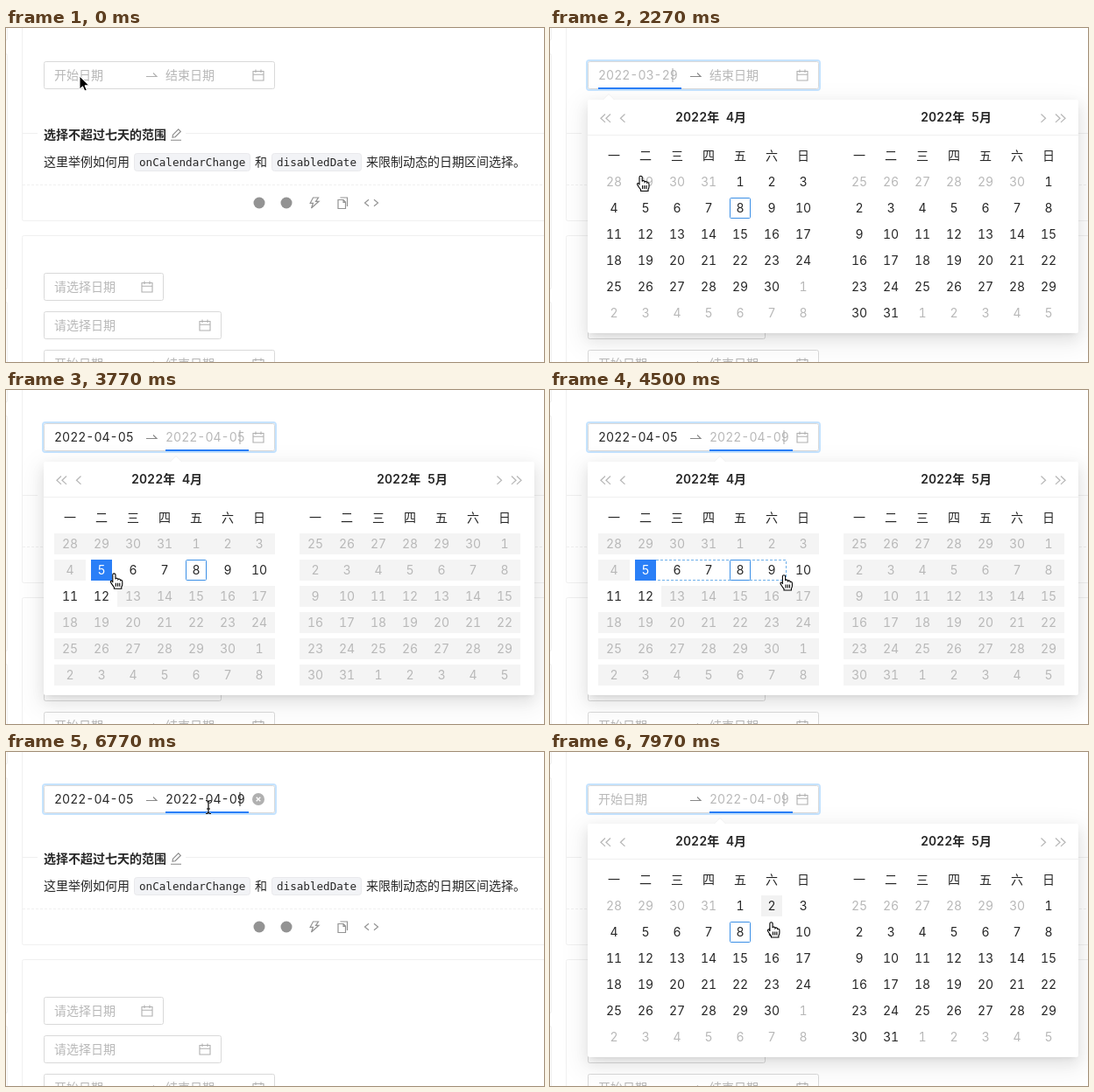
Recreate the animation shown at these times as an HTML page. Size 614x382 px, loop 8000 ms.

```html
<!DOCTYPE html>
<html lang="zh-CN">
<head>
<meta charset="utf-8">
<style>
  html, body { margin: 0; width: 100%; height: 100%; overflow: hidden; background: #fff; }
  svg { display: block; width: 614px; height: 382px; }
  text {
    font: 14px Inter, "Noto Sans CJK SC", "Noto Sans CJK", sans-serif;
    font-variant-numeric: tabular-nums; fill: #262626; white-space: pre;
  }
  .bold { font-weight: 600; }
  .mid { text-anchor: middle; }
  .off { fill: #b8b8b8; }
  .picked { fill: #fff; }
  .code { font: 12.6px "DejaVu Sans Mono", monospace; }
  .line { fill: none; stroke: #f0f0f0; }
  .box { fill: #fff; stroke: #d9d9d9; }
  .icon { fill: none; stroke: #b0b0b0; stroke-width: 1.1; }
  .nav { fill: none; stroke: #b8b8b8; stroke-width: 1.3; }
  .tool { fill: none; stroke: #666; stroke-width: 1.2; }
</style>
</head>
<body>
<svg id="stage" viewBox="0 0 614 382"></svg>
<script>
const BLUE = '#2a7ff7';
const START = 8, TODAY = 11, END = 12, LAST = 15;   // cell indices in the left month
const FOCUS = 1730, OPEN = 1780, PICK_START = 3300, PICK_END = 4970, CLOSE = 5280, REOPEN = 6820;

// ---------- markup helpers ----------
const text = (x, y, s, cls = '', id = '') => `<text id="${id}" x="${x}" y="${y + 5}" class="${cls}">${s}</text>`;
const rect = (x, y, w, h, attrs = '') => `<rect x="${x}" y="${y}" width="${w}" height="${h}" ${attrs}/>`;
const path = (d, attrs) => `<path d="${d}" ${attrs}/>`;
const input = (y, w, attrs = '') => rect(43.5, y + .5, w - 1, 31, `rx="2" class="box" ${attrs}`);
const calendarIcon = (x, y, id = '') =>
  path(`M${x - 6} ${y - 4.5}h12v10.5h-12zM${x - 6} ${y - .8}h12M${x - 3} ${y - 6.5}v3.5M${x + 3} ${y - 6.5}v3.5`, `class="icon" id="${id}"`);
const swapIcon = (y, id = '') => path(`M160 ${y + 1.5}h12l-4 -4`, `class="icon" id="${id}"`);
const chip = (x, w, s) => rect(x + .5, 143.5, w - 1, 20, 'rx="3" fill="#f2f3f6" stroke="#e9e9ec"') + text(x + 6, 152.7, s, 'code');
const chevron = (x, dir) => `M${x + dir * 2.5} 98.5l${-dir * 5} 4.7l${dir * 5} 4.7`;

const cellX = i => 73 + 36 * (i % 7);
const cellY = i => 176 + 30 * Math.floor(i / 7);
const cellDate = (month, i) => month ? new Date(2022, 3, 25 + i) : new Date(2022, 2, 28 + i);
const cellBox = (i, attrs) => rect(cellX(i) - 12, cellY(i) - 12, 24, 24, attrs);
const cells = Array.from({ length: 84 }, (_, n) => {
  const month = n < 42 ? 0 : 1, i = n % 42, date = cellDate(month, i);
  return { month, i, day: date.getDate(), inside: date.getMonth() === 3 + month };
});

const page = () =>
  rect(-20, -20, 21.5, 34, 'rx="2" class="line"') +
  rect(-20, 29.5, 21.5, 269, 'rx="2" class="line"') +
  rect(-20, 313.5, 21.5, 100, 'rx="2" class="line"') +
  rect(18.5, -20, 640, 240.5, 'rx="2" class="line"') +
  rect(18.5, 237.5, 640, 200, 'rx="2" class="line"') +
  path('M19 120.5H36M205 120.5H614', 'class="line"') +
  path('M19 179.5H614', 'class="line" stroke-dasharray="3 2"') +
  text(43, 122, '选择不超过七天的范围', 'bold') +
  path('M188 128.3h12M190 125.2l.5 -3l6.3 -6.3l2.5 2.5l-6.3 6.3z', 'fill="none" stroke="#888" stroke-width="1.1"') +
  text(43, 153, '这里举例如何用') + chip(146, 133, 'onCalendarChange') +
  text(284, 153, '和') + chip(303, 103, 'disabledDate') +
  text(411, 153, '来限制动态的日期区间选择。') +
  `<g id="tools"><circle cx="289" cy="200" r="6.5" fill="#666"/><circle cx="320" cy="200" r="6.5" fill="#666"/>` +
  path('M350.5 194h6l-3 4.3h3.5l-8.5 7.7l2 -5.7h-3.3zM379 196.5h6l2.5 2.5v7.5h-8.5zM381.5 194h8v10M385 196.5v2.8h2.5' +
       'M414 196.2l-4.5 3.8l4.5 3.8M420 196.2l4.5 3.8l-4.5 3.8', 'class="tool"') + '</g>' +
  input(280, 137) + text(55, 296, '请选择日期', 'off') + calendarIcon(161, 296) +
  input(324, 203) + text(55, 340, '请选择日期', 'off') + calendarIcon(227, 340) +
  input(368, 264) + text(55, 384, '开始日期', 'off') + swapIcon(384) + text(182, 384, '结束日期', 'off') + calendarIcon(288, 384);

const rangeInput = () =>
  rect(42, 37, 266, 34, 'rx="3" fill="none" stroke="#1890ff" stroke-width="2" id="glow"') +
  input(38, 264, 'id="frame"') + rect(55, 68, 95, 2, `fill="${BLUE}" id="bar"`) +
  text(55, 54, '', '', 'from') + swapIcon(54, 'swap') + text(182, 54, '', '', 'to') + calendarIcon(288, 54, 'suffix') +
  '<g id="clear"><circle cx="288" cy="54" r="7" fill="#b0b0b0"/>' +
  path('M285.7 51.7l4.6 4.6M290.3 51.7l-4.6 4.6', 'stroke="#fff" stroke-width="1.3"') + '</g>' +
  rect(0, 46, 1, 16, 'id="caret"');

const disabledBands = () => {
  let out = '';
  for (let r = 0; r < 6; r++) {
    const y = 164 + 30 * r;
    const [x, w] = r === 1 ? [55, 36] : r === 2 ? [127, 180] : [55, 252];
    out += rect(x, y, w, 24) + rect(335, y, 252, 24);
  }
  return out;
};

const panel = () =>
  [[-8, 9, 14, .05], [0, 6, 8, .08], [4, 3, 3, .12]].map(([inset, dy, blur, a]) =>
    rect(43 + inset, 82 + dy + inset, 560 - 2 * inset, 267 - 2 * inset, `style="filter:blur(${blur}px)" opacity="${a}"`)).join('') +
  path('M-7.5 83L0 75.5L7.5 83', 'fill="#fff" stroke="#f1f1f1" id="pointer"') +
  rect(43, 82, 560, 267, 'rx="2" fill="#fff"') +
  path('M43 122.5H603', 'class="line"') +
  path(chevron(60.5, 1) + chevron(66.5, 1) + chevron(83, 1) + chevron(563, -1) + chevron(579.5, -1) + chevron(585.5, -1), 'class="nav"') +
  [0, 1].map(m => text(143 + 280 * m, 102, '2022年', 'bold') + text(201 + 280 * m, 102, `${4 + m}月`, 'bold') +
    [...'一二三四五六日'].map((s, i) => text(cellX(i) + 280 * m, 146, s, 'mid')).join('')).join('') +
  `<g id="bands" fill="#f4f4f4">${disabledBands()}</g>` +
  cellBox(0, 'fill="#f2f2f2" id="hover"') +
  rect(109, 194, 144, 24, 'fill="#e6f4ff" id="span"') +
  path('', 'fill="none" stroke="#6fb0ea" stroke-dasharray="3 2" id="preview"') +
  cellBox(START, `fill="${BLUE}" id="first"`) + cellBox(END, `fill="${BLUE}" id="second"`) +
  rect(cellX(TODAY) - 11.5, cellY(TODAY) - 11.5, 23, 23, 'rx="1" fill="none" stroke="#3a8fe6"') +
  '<g id="days">' + cells.map(c => text(cellX(c.i) + 280 * c.month, cellY(c.i), c.day, 'mid')).join('') + '</g>';

const beam = 'M-3 -7.5Q0 -7.5 0 -5.5V5.5Q0 7.5 -3 7.5M3 -7.5Q0 -7.5 0 -5.5M3 7.5Q0 7.5 0 5.5M-2 2H2';
const cursors = () =>
  path('M0 0V15L3.5 11.8L5.8 17L8.3 16L6 10.8H10.7Z', 'id="arrow" stroke="#fff"') +
  `<g id="beam" fill="none">${path(beam, 'stroke="#fff" stroke-width="2.6" opacity=".7"')}${path(beam, 'stroke="#000" stroke-width="1.2"')}</g>` +
  '<g id="hand" stroke="#000" stroke-width="1.1">' +
  path('M-1.6 10V1.3a1.6 1.6 0 0 1 3.2 0V6q.6-1.2 1.7-.9t1.2 1.5q.7-1 1.7-.6t1 1.6q1-.7 1.7 0 .6.6.5 2v2.4q0 1.6-1 3v2H0v-1.6q-1.4-1.7-3-4.2-1.6-2.2-.7-3 1-.6 2.1.8z', 'fill="#fff"') +
  path('M2 10.5v4M4.2 10.5v4M6.4 10.5v4', '') + '</g>';

const stage = document.getElementById('stage');
stage.innerHTML = `${page()}${rangeInput()}<g id="panel">${panel()}</g><g id="cursor">${cursors()}</g>`;
const el = Object.fromEntries([...stage.querySelectorAll('[id]')].filter(e => e.id).map(e => [e.id, e]));
const set = (name, attrs) => { for (const k in attrs) el[name].setAttribute(k, attrs[k]); };
const show = (name, on) => set(name, { display: on ? 'inline' : 'none' });

// ---------- motion ----------
const clamp = (v, a, b) => Math.min(b, Math.max(a, v));
const ramp = (t, start, length) => clamp((t - start) / length, 0, 1);
const easeOut = p => 1 - (1 - p) ** 5;
const smooth = p => p * p * (3 - 2 * p);
const mix = (a, b, p) => a + (b - a) * p;

const route = [
  [0, 84, 55], [170, 84, 55], [230, 83, 54.5], [470, 83, 54.5], [870, 82, 52], [1850, 82, 52],
  [2530, 114, 226], [2570, 114, 226], [3030, 113.5, 209.5], [3600, 113.5, 209.5], [4100, 150, 212], [4130, 150, 212],
  [4300, 285, 213], [4500, 267, 212], [4770, 264, 210], [5900, 264, 210], [6250, 205, 130], [6700, 231, 63],
  [7470, 231, 63], [7800, 250, 172], [7900, 252.5, 186], [7970, 252.5, 195], [8000, 252.5, 195]
];
function pointerAt(t) {
  const n = Math.max(1, route.findIndex(k => k[0] >= t));
  const [t0, x0, y0] = route[n - 1], [t1, x1, y1] = route[n];
  const p = smooth(ramp(t, t0, t1 - t0));
  return [mix(x0, x1, p), mix(y0, y1, p)];
}
const isOpen = t => (t >= OPEN && t < CLOSE) || t >= REOPEN;
function cellAt(t) {
  const [x, y] = pointerAt(t);
  return isOpen(t) && y >= 161 && y < 341 ? Math.floor((x - 55) / 36) + 7 * Math.floor((y - 161) / 30) : -1;
}
const pad = n => String(n).padStart(2, '0');
function dateText(i) {
  const d = cellDate(0, i);
  return `${d.getFullYear()}-${pad(d.getMonth() + 1)}-${pad(d.getDate())}`;
}

function fillField(name, fixed, hovered, hint) {
  const i = fixed >= 0 ? fixed : hovered;
  el[name].textContent = i >= 0 ? dateText(i) : hint;
  el[name].setAttribute('class', fixed >= 0 ? '' : 'off');
}

function drawInput(t, hovered) {
  const hasValue = t >= PICK_START && t < REOPEN, done = t >= PICK_END && t < REOPEN;
  const atEnd = t >= PICK_START, blue = ramp(t, 470, 300), shift = 127 * smooth(ramp(t, PICK_START, 300));
  set('frame', { stroke: `rgb(${mix(217, 64, blue)},${mix(217, 156, blue)},${mix(217, 245, blue)})` });
  set('glow', { opacity: .25 * ramp(t, 1820, 300) });
  set('bar', { x: 55 + shift, opacity: ramp(t, FOCUS + 20, 250) });
  set('pointer', { transform: `translate(${67 + shift} 0)` });
  el.swap.style.stroke = t >= FOCUS ? '#888' : '#b0b0b0';

  fillField('from', hasValue ? START : -1, atEnd ? -1 : hovered, '开始日期');
  fillField('to', done ? END : -1, atEnd ? hovered : -1, '结束日期');
  const filled = done || hovered >= 0;
  show('caret', t >= FOCUS);
  set('caret', { x: (atEnd ? 182 : 55) + (filled ? 84.5 : 0), fill: filled && !done ? '#aaa' : '#222' });

  const clear = done && pointerAt(t)[1] < 71 ? 1 : 0;
  set('clear', { opacity: clear });
  set('suffix', { opacity: 1 - clear });
}

function drawPanel(t, hovered) {
  const level = t >= REOPEN ? easeOut(ramp(t, REOPEN, 200))
    : t >= CLOSE ? 1 - ramp(t, CLOSE, 200) ** 5 : easeOut(ramp(t, OPEN, 200));
  set('panel', { opacity: level, transform: `translate(0 82) scale(1 ${.8 + .2 * level}) translate(0 -82)` });
  show('panel', level > 0);

  const limited = t >= PICK_START && t < REOPEN, done = limited && t >= PICK_END;
  ['bands', 'first'].forEach(n => show(n, limited));
  ['span', 'second'].forEach(n => show(n, done));

  const lit = limited ? -1 : cellAt(t - 60);   // the highlight fades a little late
  show('hover', lit >= 0);
  if (lit >= 0) set('hover', { x: cellX(lit) - 12, y: cellY(lit) - 12 });

  const reach = clamp(hovered, START, LAST);
  show('preview', limited && !done && reach > START);
  set('preview', { d: `M121 194.5H${cellX(reach) + 16.5}V217.5H121` });

  cells.forEach((c, n) => {
    const picked = !c.month && ((limited && c.i === START) || (done && c.i === END));
    const free = limited ? !c.month && c.i >= START && c.i <= LAST : c.inside;
    el.days.children[n].setAttribute('class', 'mid ' + (picked ? 'picked' : free ? '' : 'off'));
  });
}

function drawCursor(t) {
  const [x, y] = pointerAt(t);
  const kind = t < 470 ? 'arrow' : y < 71 ? 'beam' : isOpen(t) && y >= 161 ? 'hand' : 'arrow';
  ['arrow', 'beam', 'hand'].forEach(n => show(n, n === kind));
  set('cursor', { transform: `translate(${x} ${y})` });
}

function frame() {
  const t = performance.now() % 8000, hovered = cellAt(t);
  drawInput(t, hovered);
  drawPanel(t, hovered);
  drawCursor(t);
  set('tools', { opacity: .7 + .3 * (ramp(t, CLOSE, 250) - ramp(t, 6020, 300)) });
  requestAnimationFrame(frame);
}
frame();
</script>
</body>
</html>
```
